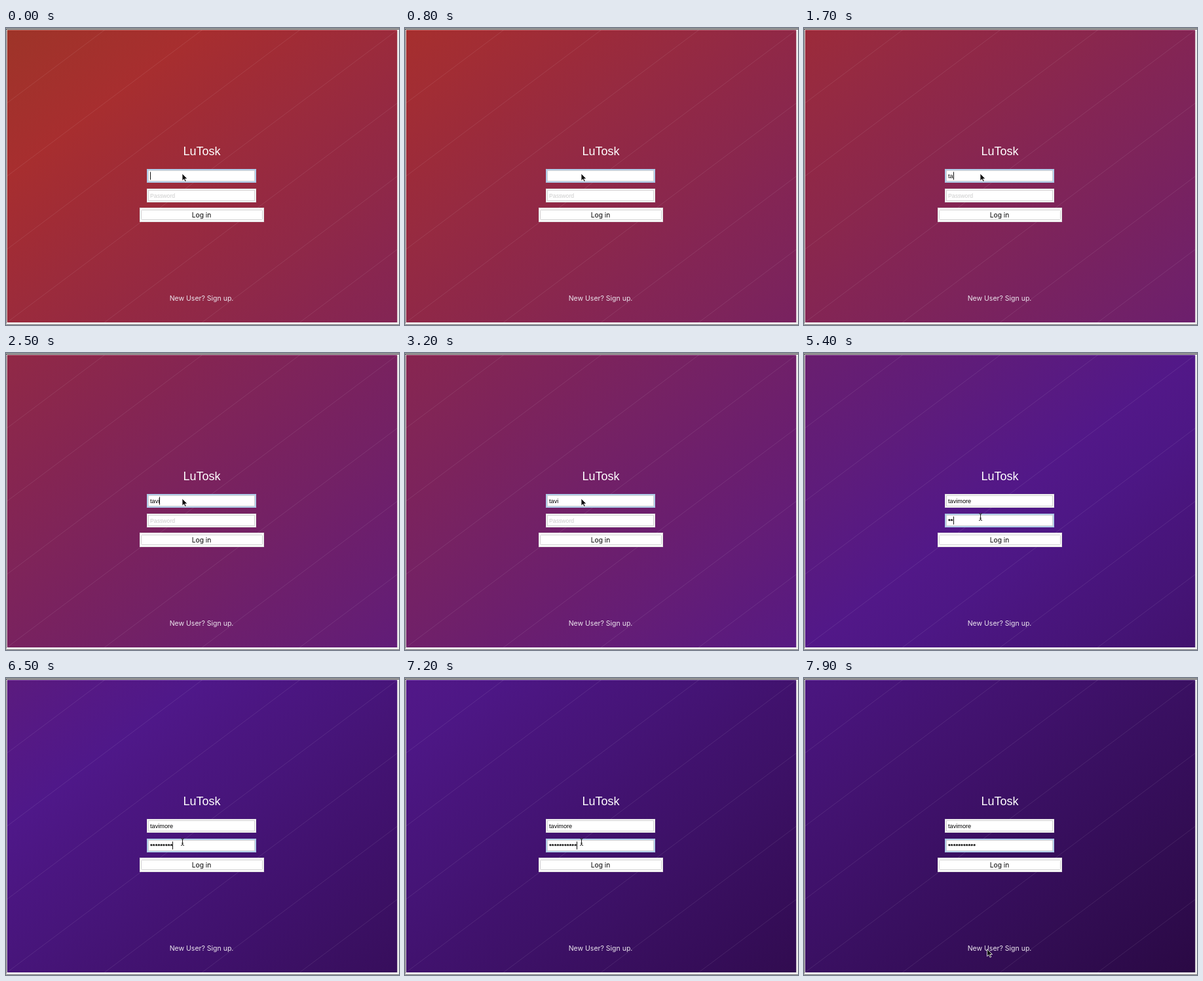
These frames come from a looping animation (600 by 453 pixels, 8 s). An HTML page:

```html
<!DOCTYPE html>
<html lang="en">
<head>
<meta charset="utf-8">
<title>Login form</title>
<style>
  html, body { margin: 0; width: 100%; height: 100%; overflow: hidden; background: #eee; }
  svg { display: block; }
  text { font-family: "Liberation Sans", Arial, sans-serif; font-size: 9.2px; white-space: pre; }
  .title { font-size: 18px; fill: #fff; text-anchor: middle; }
  .label { font-family: Inter, "Open Sans", sans-serif; font-size: 10.2px; text-anchor: middle; }
  .link { font-size: 10.5px; fill: #ece6ee; }
  .hint { font-size: 8.7px; fill: #cbcbcb; }
  .stars { font-size: 9.8px; font-weight: bold; }
  .seam { stroke: #fff; stroke-opacity: .09; }
  .box { fill: #fff; }
  .rim { fill: none; stroke: #dedede; }
  .ring { fill: none; stroke: #77aee6; }
  .line { fill: none; stroke: #cfcfcf; }
</style>
</head>
<body>
<svg width="600" height="453" viewBox="0 0 600 453">
  <defs>
    <linearGradient id="sky" x1="0" y1="0" x2="1" y2="1"></linearGradient>
  </defs>
  <rect width="600" height="453" fill="#eee"/>
  <rect y="1" width="600" height="1" fill="#111"/>
  <rect y="2" width="1" height="449" fill="#888"/>
  <rect y="452" width="600" height="1" fill="#777"/>
  <svg id="back" x="1.5" y="3" width="596" height="446">
    <rect width="596" height="446" fill="url(#sky)"/>
  </svg>

  <text class="title" x="299" y="193.5">LuTosk</text>

  <rect class="box" x="215" y="215" width="167" height="21"/>
  <rect class="rim" x="215.5" y="215.5" width="166" height="20"/>
  <rect class="line" x="217.5" y="217.5" width="162" height="16"/>
  <text id="user" x="220" y="229"></text>

  <rect class="box" x="215" y="245" width="167" height="21"/>
  <rect class="rim" x="215.5" y="245.5" width="166" height="20"/>
  <rect class="line" x="217.5" y="247.5" width="162" height="16"/>
  <text id="hint" class="hint" x="220" y="258.5">Password</text>
  <text id="pass" class="stars" x="220" y="259"></text>

  <g id="focus">
    <rect class="ring" x="216" y="216" width="165" height="19"/>
    <rect id="caret" y="219.5" width="1" height="12" fill="#111"/>
  </g>

  <rect class="box" x="204" y="274" width="190" height="22"/>
  <rect class="rim" x="204.5" y="274.5" width="189" height="21"/>
  <rect class="line" x="206.5" y="277.5" width="185" height="15" rx="1"/>
  <text class="label" x="298.5" y="289">Log in</text>

  <text class="label link" x="298.5" y="415.5">New User? Sign up.</text>

  <g id="mouse">
    <path id="arrow" d="M0 0V11L2.6 8.7L4.5 12.6L6.3 11.8L4.5 8H8Z" fill="#111" stroke="#fff" stroke-width=".8"/>
    <path id="beam" d="M-2.5 -5.5Q0 -5.5 0 -3Q0 -5.5 2.5 -5.5M0 -4V4M-2.5 5.5Q0 5.5 0 3Q0 5.5 2.5 5.5M-1.5 2H1.5" fill="none" stroke="#222"/>
  </g>
</svg>
<script>
const LOOP = 8000, STEP = 100, BANDS = 8, DRIFT = 0.28 / 1000;
const NAME = "tavimore";
const nameKeys = [1300, 1600, 2200, 2500, 3500, 3700, 3900, 4100];
const passKeys = [5100, 5300, 5500, 5700, 5800, 6000, 6200, 6300, 6500, 6800, 7100];
const SWITCH = 4600;

// Palette positions along the drifting colour ramp
const ramp = [
  [0, 158, 52, 40],
  [0.25, 167, 46, 47],
  [2.05, 80, 24, 138],
  [3.25, 41, 9, 66]
];
// Pointer path: time, x, y
const route = [
  [0, 269, 222],
  [3800, 269, 222],
  [4300, 269, 246],
  [4600, 269.5, 250],
  [7200, 269.5, 250],
  [7700, 279.5, 413.5]
];

const NS = "http://www.w3.org/2000/svg";
const get = id => document.getElementById(id);
const show = (id, on) => get(id).setAttribute("visibility", on ? "inherit" : "hidden");

function add(parent, tag, attrs) {
  const el = document.createElementNS(NS, tag);
  for (const key in attrs) el.setAttribute(key, attrs[key]);
  return parent.appendChild(el);
}

function sample(points, at) {
  let i = 1;
  while (i < points.length - 1 && points[i][0] < at) i++;
  const a = points[i - 1], b = points[i];
  const k = Math.min(1, Math.max(0, (at - a[0]) / (b[0] - a[0])));
  return a.slice(1).map((v, n) => v + (b[n + 1] - v) * k);
}

const stops = [];
for (let i = 0; i <= BANDS; i++) {
  stops.push(add(get("sky"), "stop", { offset: i / BANDS }));
  const c = 2 * i / BANDS;
  if (i && i < BANDS) add(get("back"), "path", { class: "seam", d: `M0 ${c * 446}L${c * 596} 0` });
}

function draw(t) {
  stops.forEach((stop, i) => {
    const rgb = sample(ramp, i / BANDS + t * DRIFT).map(Math.round);
    stop.setAttribute("stop-color", `rgb(${rgb})`);
  });

  const inPass = t >= SWITCH;
  const typed = keys => keys.filter(k => k <= t).length;
  get("user").textContent = NAME.slice(0, typed(nameKeys));
  get("pass").textContent = "*".repeat(typed(passKeys));
  show("hint", !inPass);

  // The caret stays on after each key, then blinks
  const last = Math.max(0, ...[...nameKeys, SWITCH, ...passKeys].filter(k => k <= t));
  const field = get(inPass ? "pass" : "user");
  const width = field.textContent ? field.getComputedTextLength() : 0;
  get("focus").setAttribute("transform", `translate(0 ${inPass ? 30 : 0})`);
  get("caret").setAttribute("x", Math.round(220 + width));
  show("caret", (t - last) % 900 < 600);

  const [x, y] = sample(route, t);
  const beam = y > 236 && y < 266;
  get("mouse").setAttribute("transform", `translate(${x} ${y})`);
  show("beam", beam);
  show("arrow", !beam);
}

const start = performance.now();
function tick() {
  const t = (performance.now() - start) % LOOP;
  draw(Math.floor(t / STEP) * STEP);
  requestAnimationFrame(tick);
}
tick();
</script>
</body>
</html>
```
